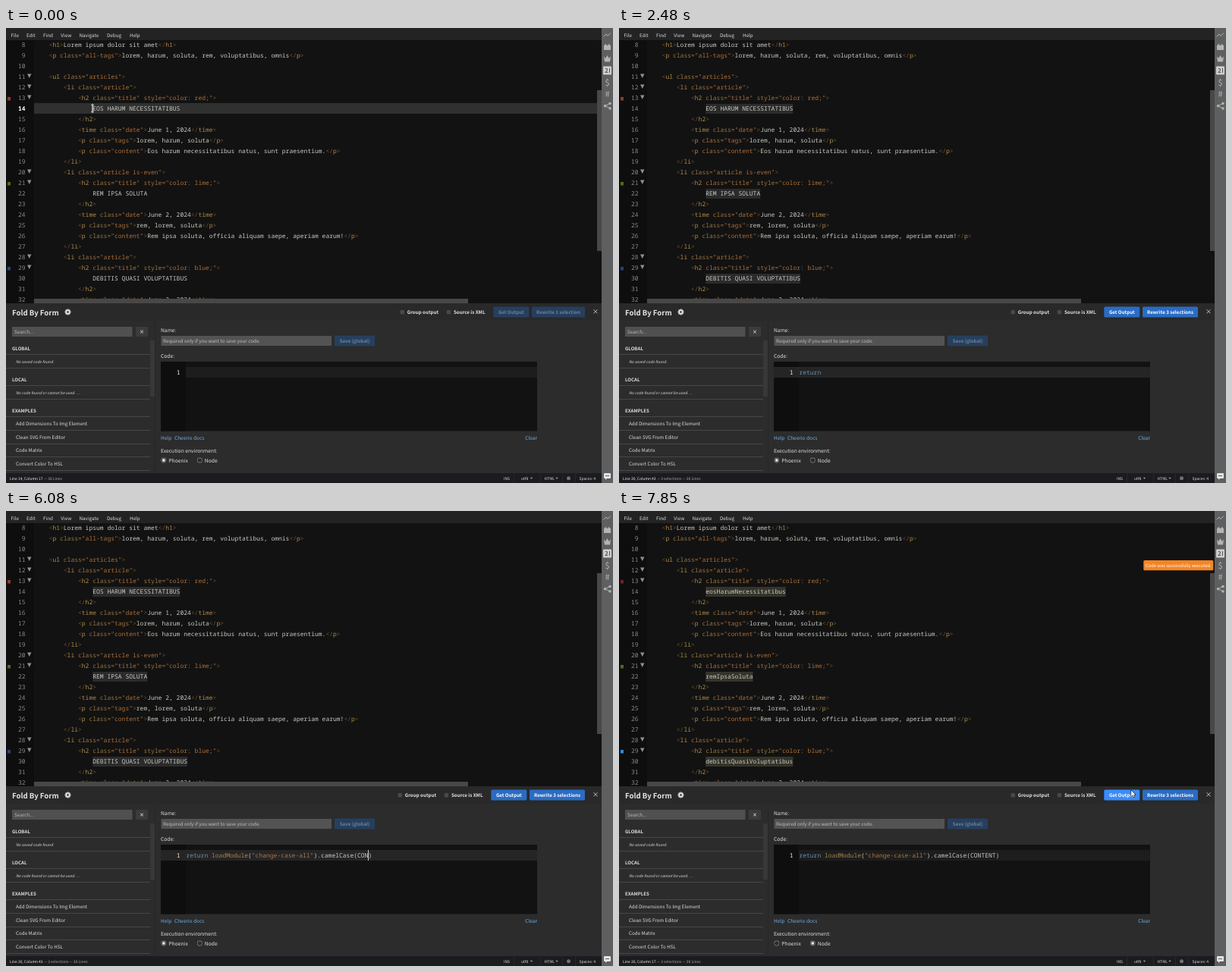
Write an HTML page with a canvas that moves like this. It is 800x600 px and loops after 8 s.

```html
<!DOCTYPE html>
<html lang="en">
<head>
<meta charset="utf-8">
<title>Multi-cursor rewrite</title>
<style>
html, body { margin: 0; width: 100%; height: 100%; overflow: hidden; background: #111; }
canvas { display: block; }
</style>
</head>
<body>
<canvas id="stage" width="800" height="600"></canvas>
<script>
const ctx = document.getElementById('stage').getContext('2d');
ctx.textRendering = 'geometricPrecision';

const LOOP = 8000;
const CHAR = 4.8;            // advance of the code font
const CODE_X = 37.4, SNIPPET_X = 237.4;
const UI = '"Noto Sans CJK JP", "Noto Sans CJK", "Noto Sans", sans-serif';
const MONO = '"Noto Sans Mono", "Liberation Mono", monospace';
const COLORS = { punct: '#6b5630', tag: '#b08a4a', attr: '#9a7440', string: '#ad6f38', text: '#c8c8c2' };

// Moments of the story
const CLICK_2 = 340, CLICK_3 = 700, HOME = 840, SELECT = 960, BLUR = 1900;
const TYPE = 2100, TYPED = 6520, NODE = 6880, REWRITE = 7360, TOAST = 7530, RESELECT = 7770;

const page = `    <h1>Lorem ipsum dolor sit amet</h1>
    <p class="all-tags">lorem, harum, soluta, rem, voluptatibus, omnis</p>

    <ul class="articles">
        <li class="article">
            <h2 class="title" style="color: red;">

            </h2>
            <time class="date">June 1, 2024</time>
            <p class="tags">lorem, harum, soluta</p>
            <p class="content">Eos harum necessitatibus natus, sunt praesentium.</p>
        </li>
        <li class="article is-even">
            <h2 class="title" style="color: lime;">

            </h2>
            <time class="date">June 2, 2024</time>
            <p class="tags">rem, lorem, soluta</p>
            <p class="content">Rem ipsa soluta, officia aliquam saepe, aperiam earum!</p>
        </li>
        <li class="article">
            <h2 class="title" style="color: blue;">

            </h2>
            <time class="date">June 3, 2024</time>`.split('\n');
const FIRST_LINE = 8;
const titleLines = [14, 22, 30];
const upperTitles = ['EOS HARUM NECESSITATIBUS', 'REM IPSA SOLUTA', 'DEBITIS QUASI VOLUPTATIBUS'];
const camelTitles = ['eosHarumNecessitatibus', 'remIpsaSoluta', 'debitisQuasiVoluptatibus'];

const snippet = [['return ', '#6a90ac'], ['loadModule', '#a3834f'], ['(', '#c8c8c2'],
  ['"change-case-all"', '#a9764a'], [').camelCase(CONTENT)', '#c8c8c2']];
// start, end, first column, last column
const bursts = [[2100, 2320, 0, 7], [2640, 3440, 7, 21], [3480, 4080, 21, 32], [4220, 4500, 32, 37],
  [4960, 5200, 37, 42], [5360, 5720, 42, 47], [5920, 5940, 47, 49], [6080, 6180, 49, 54], [6340, 6341, 54, 55]];
// time, x, y
const mousePath = [[20, 114, 106], [320, 130, 218], [400, 130, 218], [680, 143, 328], [1180, 143, 328],
  [1220, 276, 107], [1520, 276, 107], [1880, 330, 470], [6520, 330, 470], [6840, 272, 572],
  [6980, 272, 572], [7290, 716, 379], [7530, 716, 379], [7630, 675, 368]];

function box(x, y, w, h, color, radius = 0) {
  ctx.fillStyle = color;
  ctx.beginPath();
  ctx.roundRect(x, y, w, h, radius);
  ctx.fill();
}

function shape(points, fill, stroke, close = true) {
  ctx.beginPath();
  points.forEach(([x, y]) => ctx.lineTo(x, y));
  if (close) ctx.closePath();
  if (fill) { ctx.fillStyle = fill; ctx.fill(); }
  if (stroke) { ctx.strokeStyle = stroke; ctx.lineWidth = 1; ctx.stroke(); }
}

function dot(x, y, r, color) {
  ctx.fillStyle = color;
  ctx.beginPath();
  ctx.arc(x, y, r, 0, 7);
  ctx.fill();
}

function label(text, x, y, size, color = '#ddd', style = '', align = 'left') {
  ctx.font = `${style} ${size}px ${UI}`;
  ctx.textAlign = align;
  ctx.fillStyle = color;
  ctx.fillText(text, x, y);
  return ctx.measureText(text).width;
}

function code(text, x, y, color, style = '', align = 'left') {
  ctx.font = `${style} 8px ${MONO}`;
  ctx.textAlign = align;
  ctx.fillStyle = color;
  ctx.fillText(text, x, y);
}

const lineY = n => 22 + (n - FIRST_LINE) * 14;
const columnX = c => CODE_X + c * CHAR;

function markup(line, y) {
  let column = 0;
  const put = (text, kind) => {
    if (text.trim()) code(text, columnX(column), y, COLORS[kind]);
    column += text.length;
  };
  for (const [all, open, tag, attrs, close] of line.matchAll(/(<\/?)(\w+)([^>]*)(>)|[^<]+/g)) {
    if (!open) {
      const indent = all.length - all.trimStart().length;
      column += indent;
      put(all.slice(indent), 'text');
      continue;
    }
    put(open, 'punct');
    put(tag, 'tag');
    attrs.split(/("[^"]*")/).forEach(part => {
      if (part[0] === ' ') { column++; part = part.slice(1); }
      put(part, part[0] === '"' ? 'string' : 'attr');
    });
    put(close, 'punct');
  }
}

function editorState(t) {
  const rewritten = t >= REWRITE;
  const titles = rewritten ? camelTitles : upperTitles;
  const ends = titles.map(s => 16 + s.length);
  const selected = t >= SELECT && t < REWRITE || t >= RESELECT;
  const count = t < CLICK_2 ? 1 : t < CLICK_3 ? 2 : 3;
  let columns = [16, 19, 22];
  if (t >= HOME) columns = [16, 16, 16];
  if (t >= SELECT && t < RESELECT) columns = ends;
  return { titles, ends, selected, count, columns, rewritten, focused: t < BLUR || rewritten };
}

function drawEditor(s) {
  ctx.save();
  ctx.beginPath();
  ctx.rect(0, 16, 785, 347);
  ctx.clip();
  box(0, 16, 785, 347, '#121212');
  box(0, 16, 37, 347, '#0e0e0e');
  titleLines.forEach((n, i) => {
    const y = lineY(n);
    if (s.selected) {
      box(columnX(16), y - 6, s.titles[i].length * CHAR, 13, s.focused ? '#35342a' : '#2b2b2b');
    } else if (i < s.count) {
      box(37, y - 7, 742, 14, '#303030');
    }
  });
  page.forEach((line, i) => {
    const n = FIRST_LINE + i, y = lineY(n), title = titleLines.indexOf(n);
    const active = !s.selected && title >= 0 && title < s.count;
    code(n, 25.6, y + 3, active ? '#fff' : '#8a8a8a', active ? 'bold' : '', 'right');
    if (title >= 0) code(s.titles[title], columnX(16), y + 3, COLORS.text);
    else markup(line, y + 3);
    if (/<(ul|li|h2) /.test(line)) shape([[28, y - 3.5], [33.5, y - 3.5], [30.75, y + 2]], '#909090');
  });
  titleLines.forEach((n, i) => {
    if (!s.selected && i < s.count) box(Math.round(columnX(s.columns[i])) - 0.5, lineY(n) - 6.5, 0.9, 13, '#ddd');
  });
  const swatches = s.rewritten ? ['#6b2420', '#55691c', '#2f88e8'] : ['#93392c', '#55691c', '#27437f'];
  swatches.forEach((color, i) => box(2, lineY(titleLines[i]) - 15, 4, 4.5, color));
  box(779, 82, 6, 212, '#484848');
  box(37, 357, 572, 6, '#484848');
  ctx.restore();
}

function drawMenu() {
  box(0, 0, 785, 16, '#232323');
  const menu = { File: 6.5, Edit: 27, Find: 49, View: 72.3, Navigate: 96.5, Debug: 133, Help: 163 };
  for (const name in menu) label(name, menu[name], 11.5, 6.3);
}

function drawToolbar() {
  box(785, 0, 15, 600, '#5e5f60');
  const c = '#b4b4b4';
  shape([[787.5, 11.5], [791, 8], [793, 10.5], [797, 6.5]], null, c, false);
  box(788, 23, 9, 6, c);
  box(789, 21.5, 2.5, 2, c);
  box(793.5, 21.5, 2.5, 2, c);
  shape([[788, 37.5], [790.3, 40], [792.5, 36], [794.7, 40], [797, 37.5], [796, 44.5], [789, 44.5]], c);
  box(787, 50.5, 11, 11, '#d0d0d0', 1);
  label('2', 789, 59, 8, '#555', 'bold');
  box(795, 53, 1, 6, '#555');
  label('$', 792.5, 75.5, 11, c, '', 'center');
  label('#', 792.5, 91, 11, c, '', 'center');
  shape([[796, 99.5], [789.5, 102.7], [796, 106]], null, c, false);
  [[796, 99.5], [789.5, 102.7], [796, 106]].forEach(([x, y]) => dot(x, y, 1.7, c));
  box(788, 587, 9, 7, '#e4e4e4', 1);
  shape([[790, 593], [793, 593], [790, 596]], '#e4e4e4');
  box(790, 590, 5, 1, '#5e5f60');
}

function drawGear(x, y) {
  for (let i = 0; i < 8; i++) {
    ctx.save();
    ctx.translate(x, y);
    ctx.rotate(i * Math.PI / 4);
    box(-0.9, -4, 1.8, 3, '#e0e0e0');
    ctx.restore();
  }
  dot(x, y, 3, '#e0e0e0');
  dot(x, y, 1.2, '#2a2a2a');
}

function button(text, x, y, w, enabled, mouse) {
  const hover = enabled && mouse && mouse.x >= x && mouse.x <= x + w && mouse.y >= y && mouse.y <= y + 14;
  box(x, y, w, 14, !enabled ? '#263f5e' : hover ? '#3a8cfb' : '#2a6cc4', 1.5);
  label(text, x + w / 2, y + 9.4, 6.2, enabled ? '#fff' : '#708196', 'bold', 'center');
}

function drawSidebar() {
  box(8, 394, 158.5, 13, '#505050');
  label('Search...', 11, 403, 6.3, '#bbb');
  box(171, 394, 16, 13, '#3b3b3b', 1);
  label('×', 179, 402.8, 6.5, '#ddd', 'bold', 'center');
  [['GLOBAL', 424.7], ['LOCAL', 465.7], ['EXAMPLES', 506.7]].forEach(([s, y]) => label(s, 8, y, 6.1, '#ddd', 'bold'));
  label('No saved code found.', 13, 441.7, 5, '#ddd', 'italic');
  label('No code found or cannot be used. …', 13, 482.7, 5, '#ddd', 'italic');
  ['Add Dimensions To Img Element', 'Clean SVG From Editor', 'Code Matrix', 'Convert Color To HSL']
    .forEach((s, i) => label(s, 13, 524 + i * 17.6, 6.28));
  [430, 448, 471, 489, 512, 530, 548, 565, 583].forEach(y => box(0, y, 190, 1, '#474747'));
  box(190, 412, 6, 74, '#383838');
  box(196, 386, 1, 201, '#272727');
}

function drawSnippet(t) {
  box(204, 440, 496, 91.5, '#121212');
  box(204, 440, 33, 91.5, '#0e0e0e');
  const focused = t >= BLUR && t < NODE;
  if (focused) box(204, 447, 496, 14, '#252525');
  else box(237, 447, 463, 14, '#1d1d1d');
  code('1', 229.6, 457, '#eee', '', 'right');

  let typed = 0;
  for (const [start, end, from, to] of bursts) {
    if (t >= start) typed = from + 1 + Math.floor(Math.min(1, (t - start) / (end - start)) * (to - from - 1));
  }
  // Closing pairs are inserted ahead of the cursor
  let shown = typed;
  let pending = '';
  if (typed >= 19 && typed < 35) pending = '")';
  else if (typed === 18 || typed === 35 || typed >= 47 && typed < 55) pending = ')';
  let column = 0;
  for (const [text, color] of snippet) {
    const part = text.slice(0, Math.max(0, shown - column));
    if (part) code(part, SNIPPET_X + column * CHAR, 457, color);
    column += text.length;
  }
  [...pending].forEach((ch, i) =>
    code(ch, SNIPPET_X + (typed + i) * CHAR, 457, ch === '"' ? '#a9764a' : '#c8c8c2'));
  const blink = t >= 2480 && t < 2640 || t >= 4820 && t < 4960;
  if (focused && !blink) box(SNIPPET_X + typed * CHAR - 0.4, 447, 0.9, 14, '#ddd');
}

function radio(x, text, on) {
  dot(x, 570, 3.4, '#8a8a8a');
  dot(x, 570, 2.8, '#2b2b2b');
  if (on) dot(x, 570, 2, '#e4e4e4');
  label(text, x + 6.5, 572.6, 6.75);
}

function drawPanel(t, s, mouse) {
  box(0, 363, 785, 224, '#2c2c2c');
  box(0, 363, 785, 23, '#292929');
  label('Fold By Form', 8, 378.6, 9.6, '#e4e4e4', 'bold');
  drawGear(81.5, 374.5);
  const plural = s.count > 1, dx = plural ? -3 : 0, enabled = t >= TYPE;
  [[519.5, 'Group output'], [580.7, 'Source is XML']].forEach(([x, text]) => {
    box(x + dx, 372, 5.5, 5.5, '#484848', 1);
    label(text, x + dx + 9.3, 377.2, 6.2, '#e4e4e4', 'bold');
  });
  button('Get Output', 642.3 + dx, 367.5, 47, enabled, mouse);
  button(`Rewrite ${s.count} selection${plural ? 's' : ''}`, 693 + dx, 367.5, 70 - dx, enabled, mouse);
  label('×', 777, 377.2, 8.5, '#ddd', '', 'center');

  drawSidebar();
  label('Name:', 204, 401, 6.72);
  box(204.5, 406, 224.5, 13, '#535353');
  label('Required only if you want to save your code.', 207, 415, 6.28, '#c0c0c0');
  button('Save (global)', 433, 405.5, 53, false);
  label('Code:', 204, 435, 6.72);
  drawSnippet(t);
  label('Help', 204, 542.7, 6.5, '#6db0ee');
  label('Cheerio docs', 222, 542.7, 6.5, '#6db0ee');
  label('Clear', 700, 542.7, 6.5, '#6db0ee', '', 'right');
  label('Execution environment:', 204, 559.7, 6.72);
  radio(207.8, 'Phoenix', t < NODE);
  radio(255.3, 'Node', t >= NODE);
}

function drawStatus(s) {
  box(0, 587, 785, 13, '#1b1c20');
  const last = s.count - 1;
  const place = `Line ${titleLines[last]}, Column ${s.columns[last] + 1}`;
  const width = label(place, 5, 595.7, 4.95, '#eee');
  const many = s.count > 1 ? ` — ${s.count} selections` : '';
  label(`${many} — 38 Lines`, 5 + width, 595.7, 4.95, '#aaa');
  [['INS', 656], ['utf8', 679], ['HTML', 709.5], ['Spaces: 4', 755.5]].forEach(([text, x]) => label(text, x, 595.7, 5, '#ddd'));
  [692.5, 726].forEach(x => shape([[x - 1.7, 592.7], [x + 1.7, 592.7], [x, 595]], '#999'));
  [669, 704, 733, 750].forEach(x => box(x, 588, 0.6, 12, '#303137'));
  dot(741.5, 593.7, 2.5, '#707070');
}

function drawToast(t) {
  if (t < TOAST) return;
  ctx.globalAlpha = Math.min(1, (t - TOAST + 20) / 100);
  box(691.3, 65, 92, 13.3, '#f58423', 1.5);
  label('Code was successfully executed.', 737.4, 74, 5.8, '#fff', '', 'center');
  ctx.globalAlpha = 1;
}

function mouseAt(t) {
  if (t >= TYPE && t < TYPED) return null;
  const i = mousePath.findIndex(p => p[0] > t);
  if (i <= 0) {
    const [, x, y] = mousePath[i < 0 ? mousePath.length - 1 : 0];
    return { x, y };
  }
  const [t0, x0, y0] = mousePath[i - 1], [t1, x1, y1] = mousePath[i];
  const k = (1 - Math.cos(Math.PI * (t - t0) / (t1 - t0))) / 2;
  return { x: x0 + (x1 - x0) * k, y: y0 + (y1 - y0) * k };
}

function drawMouse({ x, y }) {
  ctx.save();
  ctx.translate(x, y);
  if (y < 357 || y > 440 && y < 531 && x > 204 && x < 700) {
    box(-0.5, -5, 1, 10, '#ccc');
    box(-2, -5, 4, 0.9, '#ccc');
    box(-2, 4.2, 4, 0.9, '#ccc');
  } else if (y > 565 && y < 580 && x < 285) {
    box(0, 0, 1.8, 7, '#fff', 0.9);
    shape([[0, 4], [5, 4.5], [5.3, 8], [4.4, 10], [1, 10], [-1.2, 6.5], [-0.6, 5.7]], '#fff');
  } else {
    shape([[0, 0], [0, 8.5], [2, 6.7], [3.3, 9.5], [4.6, 9], [3.4, 6.2], [6, 6]], '#fff', '#222');
    shape([[0.3, 0.7], [0.3, 7.9], [2, 6.3], [3.4, 9.1], [4.3, 8.7], [3, 5.8], [5.3, 5.7]], '#fff');
  }
  ctx.restore();
}

function draw(now) {
  const t = now % LOOP, s = editorState(t), mouse = mouseAt(t);
  drawEditor(s);
  drawMenu();
  drawPanel(t, s, mouse);
  drawStatus(s);
  drawToolbar();
  drawToast(t);
  if (mouse) drawMouse(mouse);
  requestAnimationFrame(draw);
}
requestAnimationFrame(draw);
</script>
</body>
</html>
```
